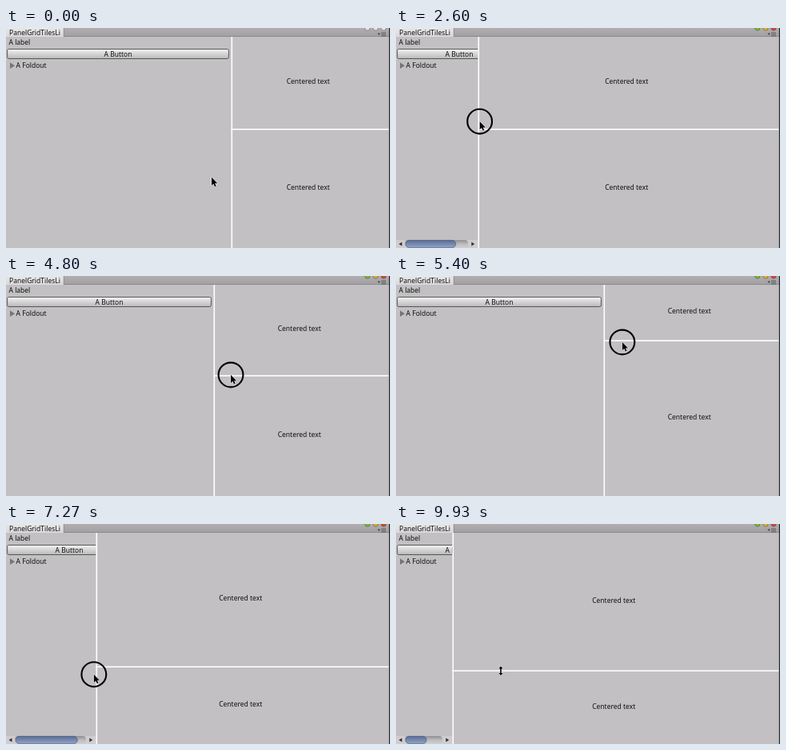
These frames come from a looping animation (480x276 px, 9.99 s). An HTML page:

```html
<!DOCTYPE html>
<html lang="en">
<head>
<meta charset="utf-8">
<title>Split panes</title>
<style>
html, body { margin: 0; width: 100%; height: 100%; overflow: hidden; background: #c2c0c2; }
svg { display: block; width: 480px; height: 276px; }
text { font: 500 8.5px "Noto Sans", "Open Sans", sans-serif; fill: #111; }
.mid { text-anchor: middle; }
</style>
</head>
<body>
<svg viewBox="0 0 480 276">
  <defs>
    <linearGradient id="face" x2="0" y2="1">
      <stop stop-color="#f2f2f2"/><stop offset=".5" stop-color="#d6d5d6"/><stop offset="1" stop-color="#bab9ba"/>
    </linearGradient>
    <linearGradient id="bar" x2="0" y2="1">
      <stop stop-color="#b0aeb0"/><stop offset="1" stop-color="#a19fa1"/>
    </linearGradient>
    <linearGradient id="tabFace" x2="0" y2="1">
      <stop stop-color="#e8e7e8"/><stop offset="1" stop-color="#dad8da"/>
    </linearGradient>
    <linearGradient id="track" x2="0" y2="1">
      <stop stop-color="#8f8e90"/><stop offset=".5" stop-color="#bdbcbe"/><stop offset="1" stop-color="#d0cfd1"/>
    </linearGradient>
    <linearGradient id="thumb" x2="0" y2="1">
      <stop stop-color="#5a6c94"/><stop offset=".5" stop-color="#7488b0"/><stop offset="1" stop-color="#93a5c6"/>
    </linearGradient>
    <clipPath id="left"><rect id="leftBox" y="11" height="265"/></clipPath>
    <clipPath id="tab"><rect width="69" height="11"/></clipPath>
  </defs>
  <rect width="480" height="276" fill="#c2c0c2"/>

  <rect width="480" height="11" fill="url(#bar)"/>
  <path d="M72 10.5H480" stroke="#8b898b"/>
  <rect width="72" height="11" fill="url(#tabFace)"/>
  <path d="M72.3 0V11" stroke="#888688" stroke-width=".8"/>
  <text x="4" y="8.6" clip-path="url(#tab)">PanelGridTilesLi</text>
  <g id="dots" stroke="#5c5a5c" stroke-width=".6"><circle cx="451.8" r="3.2"/><circle cx="462" r="3.2"/><circle cx="472" r="3.2"/></g>
  <path d="M464.5 6.5H468L466.2 9Z" fill="#444"/>
  <path d="M469 6H475M469 8H475M469 10H475" stroke="#555" stroke-width=".9"/>

  <g clip-path="url(#left)">
    <text x="3.5" y="20.8">A label</text>
    <rect id="button" x="1.6" y="26.5" height="12" rx="2" fill="url(#face)" stroke="#4c4b4c" stroke-width=".9"/>
    <text id="caption" class="mid" y="35.7">A Button</text>
    <path d="M5 43.3L11 47.2L5 51Z" fill="#777577"/>
    <text x="12.6" y="50.4">A Foldout</text>
    <g id="scroll">
      <rect id="ends" y="266" height="10" fill="#cfcdcf"/>
      <rect id="trough" x="11" y="266" height="10" rx="4" fill="url(#track)"/>
      <rect id="grip" x="12" y="266.3" height="9.4" rx="4.7" fill="url(#thumb)" stroke="#46536f" stroke-width=".6"/>
      <path d="M7.5 268.5V273.5L3.5 271Z" fill="#333"/>
      <path id="next" d="M-8.7 268.5V273.5L-4.7 271Z" fill="#333"/>
    </g>
  </g>

  <text id="upper" class="mid">Centered text</text>
  <text id="lower" class="mid">Centered text</text>
  <rect id="vLine" y="11" width="1.6" height="265" fill="#fff"/>
  <rect id="hLine" height="1.6" fill="#fff"/>
  <path d="M479.4 0V276" stroke="#2a2a2a" stroke-width="1.2"/>

  <g id="pointer">
    <circle id="ring" fill="none" stroke="#000" stroke-width="2.1"/>
    <path id="shape" stroke="#fff" stroke-width="1" paint-order="stroke"/>
  </g>
</svg>
<script>
const LOOP = 9990, STEP = 1000 / 15, LAG = 10, CONTENT = 160;
const $ = id => document.getElementById(id);
const set = (id, attrs) => { for (const k in attrs) $(id).setAttribute(k, attrs[k]); };

// Pointer stops: time, x, y
const stops = [
  [0, 257, 187], [667, 257, 187], [1670, 282, 117], [2042, 282, 117],
  [2470, 90, 117], [3190, 260, 116], [3590, 260, 116], [4270, 281, 127],
  [4530, 281, 127], [4600, 281, 125.2], [4770, 281, 125.2], [5130, 281, 48],
  [5930, 288, 179], [6130, 288, 179], [6500, 260, 190], [6700, 260, 190],
  [7500, 71, 188], [7650, 71, 188], [8000, 110, 179], [8120, 110, 179],
  [8430, 112, 250], [8964, 124, 50], [9650, 128, 210], [9930, 131, 184]
];
// Drags: press time, release time, axis
const drags = [
  [1795, 3390, "x"], [4525, 5925, "y"], [6595, 7600, "x"], [8065, 9930, "y"]
];
const focusClick = [395, 600];

const shapes = {
  arrow: "M0 0V10.2L2.3 8.1L4 11.6L5.7 10.9L4.1 7.5H7.2Z",
  x: "M-5.6 0L-2.6 -2.8V-.8H2.6V-2.8L5.6 0L2.6 2.8V.8H-2.6V2.8Z",
  y: "M0 -5.8L2.8 -2.8H.8V2.8H2.8L0 5.8L-2.8 2.8H-.8V-2.8H-2.8Z"
};

function pointerAt(t) {
  const i = stops.findIndex(s => s[0] > t);
  if (i < 0) { const [, x, y] = stops[stops.length - 1]; return { x, y }; }
  const a = stops[i - 1], b = stops[i];
  const u = (t - a[0]) / (b[0] - a[0]), e = u * u * (3 - 2 * u);
  return { x: a[1] + (b[1] - a[1]) * e, y: a[2] + (b[2] - a[2]) * e };
}

function splitAt(t) {
  const split = { x: 282, y: 127 };
  for (const [from, to, axis] of drags)
    if (t >= from) split[axis] = pointerAt(Math.min(t, to) - LAG)[axis];
  return split;
}

function cursorKind(p, split, drag) {
  if (drag) return Math.abs(p[drag[2]] - split[drag[2]]) < .6 ? drag[2] : "arrow";
  if (Math.abs(p.x - split.x) < 3) return "x";
  return p.x > split.x && Math.abs(p.y - split.y) < 3 ? "y" : "arrow";
}

function drawPanes(X, Y) {
  const full = Math.max(X, CONTENT);
  set("leftBox", { width: X - .5 });
  set("button", { width: full - 5.2 });
  set("caption", { x: full / 2 - 1 });
  set("scroll", { visibility: X < CONTENT ? "visible" : "hidden" });
  set("ends", { width: X });
  set("trough", { width: X - 24 });
  set("grip", { width: Math.max(8, (X - 22) * Math.min(1, X / 133)) });
  set("next", { transform: `translate(${X} 0)` });
  const cx = (X + 473.5) / 2;
  set("upper", { x: cx, y: (Y + 8) / 2 + 2.8 });
  set("lower", { x: cx, y: (Y + 274) / 2 + 2.8 });
  set("vLine", { x: X - .5 });
  set("hLine", { x: X - .5, y: Y - .6, width: 479 - X });
}

function draw(t) {
  const p = pointerAt(t), split = splitAt(t);
  const drag = drags.find(d => t >= d[0] && t < d[1]);
  const pressed = drag || (t >= focusClick[0] && t < focusClick[1]);
  const kind = cursorKind(p, split, drag);
  drawPanes(Math.round(split.x), Math.round(split.y));

  const colors = t > 460 ? ["#7cb82e", "#d9b02c", "#d8432f"] : ["#e4e3e4", "#e4e3e4", "#e4e3e4"];
  [...$("dots").children].forEach((dot, i) => dot.setAttribute("fill", colors[i]));

  set("pointer", { transform: `translate(${p.x} ${p.y + .3})` });
  set("shape", { d: shapes[kind] });
  set("ring", { r: kind === "arrow" ? 15.4 : 21, visibility: pressed ? "visible" : "hidden" });
}

function tick(now) {
  const t = now % LOOP;
  draw(Math.floor((t + 4) / STEP) * STEP);
  requestAnimationFrame(tick);
}
draw(0);
requestAnimationFrame(tick);
</script>
</body>
</html>
```
